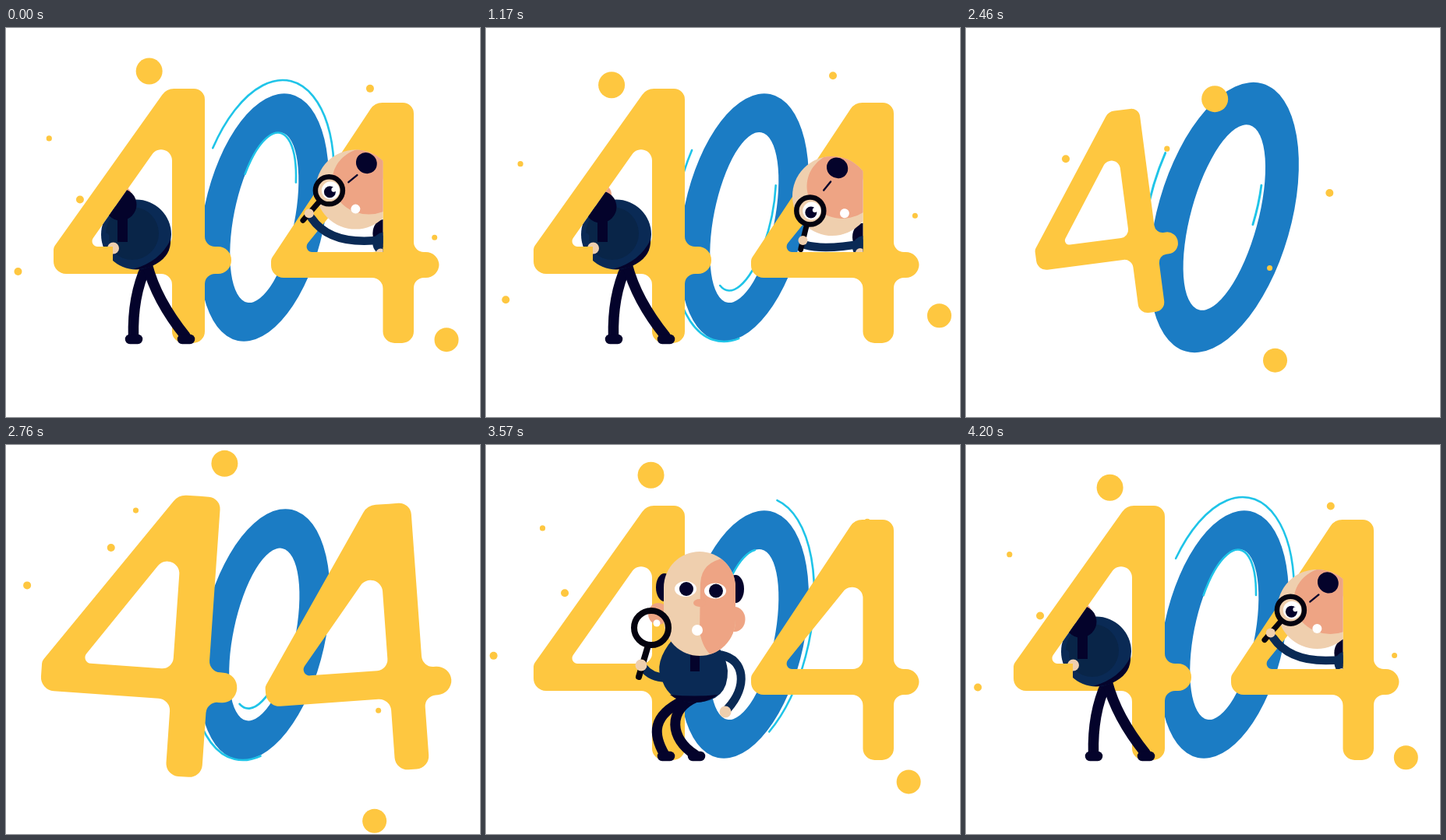
Recreate the animation shown at these times as an HTML page with a canvas. Size 608 by 500 pixels, loop 4.23 s.

```html
<!DOCTYPE html>
<html lang="en">
<head>
<meta charset="utf-8">
<title>404</title>
<style>
html, body { margin: 0; width: 100%; height: 100%; overflow: hidden; background: #fff; }
canvas { display: block; }
</style>
</head>
<body>
<canvas id="stage" width="608" height="500"></canvas>
<script>
const g = document.getElementById('stage').getContext('2d');
const YELLOW = '#fec740', BLUE = '#1b7cc4', CYAN = '#1fc4e8', NAVY = '#0a2a55', DARK = '#04032b',
      BLACK = '#04030f', SKIN = '#efcfae', PINK = '#eea484', WHITE = '#fff';
const LOOP = 4.23, CUT = 2.16, RAD = Math.PI / 180, TAU = 2 * Math.PI;

// Smoothstep from 0 to 1 between times a and b.
function ease(t, a, b) {
  const x = Math.min(1, Math.max(0, (t - a) / (b - a)));
  return x * x * (3 - 2 * x);
}
const mix = (a, b, k) => a + (b - a) * k;
const polar = (x, y, r, angle) => [x + r * Math.cos(angle * RAD), y + r * Math.sin(angle * RAD)];

function layer(draw) {
  g.save();
  draw();
  g.restore();
}
function disc(x, y, rx, color, ry = rx, angle = 0) {
  g.fillStyle = color;
  g.beginPath();
  g.ellipse(x, y, rx, ry, angle * RAD, 0, TAU);
  g.fill();
}
function ring(x, y, r, width) {
  g.strokeStyle = BLACK;
  g.lineWidth = width;
  g.beginPath();
  g.arc(x, y, r, 0, TAU);
  g.stroke();
}
function fill(d, color) {
  g.fillStyle = color;
  g.fill(new Path2D(d));
}
function line(d, color, width) {
  g.strokeStyle = color;
  g.lineWidth = width;
  g.lineCap = 'round';
  g.stroke(new Path2D(d));
}
function foot(x, y) {
  line(`M${x - 5},${y}h10`, DARK, 12.5);
}

// Closed polygon of [x, y, corner radius].
function rounded(pts) {
  const last = pts[pts.length - 1];
  g.moveTo((last[0] + pts[0][0]) / 2, (last[1] + pts[0][1]) / 2);
  pts.forEach(([x, y, r], i) => {
    const [nx, ny] = pts[(i + 1) % pts.length];
    g.arcTo(x, y, nx, ny, r);
  });
  g.closePath();
}
// Stem runs a..b, crossbar u..d; tip and peak are the sharp corners of the hole.
function four({ left, right, a, b, top, u, d, cornerY, topX, tip, peak }) {
  g.fillStyle = YELLOW;
  g.beginPath();
  rounded([[b, top, 14], [b, u, 13], [right, u, 17], [right, d, 17], [b, d, 13], [b, 405, 15],
    [a, 405, 15], [a, d, 14], [left, d, 16], [left, cornerY, 9], [topX, top, 18]]);
  rounded([[tip, u, 7], [a, u, 13], [a, peak, 14]]);
  g.fill('evenodd');
}
const LEFT4 = { left: 61, right: 289, a: 213, b: 255, top: 78, u: 281, d: 316,
  cornerY: 282, topX: 206, tip: 104, peak: 126 };
const RIGHT4 = { left: 340, right: 555.5, a: 483.5, b: 523, top: 96, u: 288, d: 321,
  cornerY: 297, topX: 473, tip: 378, peak: 157 };

// Back-eased entrance around a digit's centre; the tilt follows the overshoot.
function pop(t, x, y, turn, draw) {
  if (t <= 0) return;
  const v = Math.min(1, t / .65) - 1, scale = 1 + 3 * v ** 3 + 2 * v ** 2;
  layer(() => {
    g.translate(x, y);
    g.rotate((scale - 1) * 38 * turn * RAD);
    g.scale(scale, scale);
    g.translate(-x, -y);
    draw();
  });
}

// Arc that grows out of one point, then runs around the ellipse.
function trail(s, x, y, rx, ry, tilt, start, base, speed) {
  const grown = ease(s, 2.2, 3.1);
  const from = mix(start, base + speed * (s - LOOP), grown) - 90;
  g.strokeStyle = CYAN;
  g.lineWidth = 2.6;
  g.lineCap = 'round';
  g.beginPath();
  g.ellipse(x, y, rx, ry, tilt * RAD, from * RAD, (from + 130 * grown) * RAD);
  g.stroke();
}
function zero(s) {
  g.fillStyle = BLUE;
  g.beginPath();
  g.ellipse(331, 243.5, 77.5, 162, 12 * RAD, 0, TAU);
  g.closePath();
  g.ellipse(331.3, 243.5, 39, 111.4, 11.3 * RAD, 0, TAU);
  g.fill('evenodd');
  trail(s, 330, 235, 86.2, 170.5, 11.4, 292, -67, -112);
  trail(s, 330.5, 236, 36.5, 103.4, 11.8, 60, 294, 113);
}

// Orbit radius, resting angle, size.
const DOTS = [[237, -133.5, 17], [288.5, 22.8, 15.5], [227, -58, 5], [285, -166.4, 3.6],
  [231.5, -3.9, 3.5], [310, 159.6, 5], [226, 178.8, 5]];
function dots(s) {
  const x = Math.min(1, (s - CUT) / .76);
  const swing = 46.5 * Math.exp(-.785 * (s - 2.46)) - 2.9;
  for (const [r, angle, size] of DOTS) {
    const burst = size < 4 ? x : 1 - (1 - x) ** 2.2; // specks drift, big dots shoot out
    disc(...polar(319, 250, r * burst, angle + swing), size * Math.min(1, x * 5), YELLOW);
  }
}

// Crawling through the zero, seen from behind.
function crawler(s) {
  const grow = ease(s, 2.82, 2.98);
  g.beginPath();
  g.rect(0, 0, 376, 500);
  g.clip();
  g.translate(270 + 70 * (1 - ease(s, 2.82, 3.04)) - 30 * ease(s, 3.2, 3.32), 400);
  g.scale(grow, grow);
  g.translate(-270, -400);
  line('M347,245Q356,224 382,209', NAVY, 11);
  disc(324, 273, 45, '#0a2850');
  disc(366, 262, 22, DARK);
  fill('M285,250Q272,272 284,298L291,306Q290,275 285,250Z', DARK);
  line('M284,280Q262,310 238,385', DARK, 13);
  line('M284,288Q268,335 271,397', DARK, 13);
  line('M232,392L239,387', DARK, 12.5);
  foot(270, 400);
}

// Standing in front of the zero with the glass.
function seeker(s) {
  const sway = 1 - ease(s, 3.3, 3.42) - ease(s, 3.74, 3.84);
  g.translate(250 + 25 * sway, 400);
  g.rotate(8 * sway * RAD);
  g.translate(-250, -400);
  disc(221, 217, 13, PINK, 14);
  line('M234,299Q212,300 202,286', NAVY, 11);
  line('M302,270C332,276 336,310 310,339', NAVY, 11);
  disc(307, 343, 7.5, SKIN);
  line('M254,328C212,348 214,372 229,398', DARK, 13);
  line('M270,324C232,340 236,378 268,398', DARK, 13);
  foot(231, 400);
  foot(270, 400);
  fill('M240,249Q214,280 226,303Q236,331 268,331Q311,330 310,290Q307,265 292,255Z', NAVY);
  fill('M236,321Q268,324 297,321Q284,331 268,331Q248,331 236,321Z', DARK);
  fill('M262,268H274V291H262Z', DARK);
  disc(229, 183, 11, DARK, 18);
  disc(320, 185, 11, DARK, 18);
  disc(319, 224, 13.5, PINK, 16);
  layer(() => {
    g.beginPath();
    g.roundRect(228, 137, 92, 134, 46);
    g.clip();
    g.fillStyle = SKIN;
    g.fillRect(228, 137, 92, 134);
    fill('M308,145Q276,150 275,178L274,240Q278,262 290,271H330V145Z', PINK);
  });
  disc(274, 203, 8, PINK, 5);
  for (const [x, y] of [[256, 185], [294, 187.5]]) {
    disc(x, y, 14, WHITE, 10);
    disc(x + 1, y, 9, DARK);
  }
  disc(271, 238, 7, WHITE);
  line('M207,261L196,298', BLACK, 8);
  ring(212, 235, 22, 8);
  disc(219, 229, 4.5, WHITE);
  disc(199, 283, 7.5, SKIN);
}

// Bent into the hole of the first digit, whose diagonal and bar hide the rest.
function peeper(s) {
  const nod = ease(s, 4.5, 5.1) - ease(s, 5.45, 5.9);
  g.clip(new Path2D('M231,100L104,281H137V500H608V100Z'));
  g.translate(34 * (1 - ease(s, 3.8, 4)), 0);
  line('M180,306Q162,345 163.5,397', DARK, 13.5);
  line('M181,304Q193,350 230,396', DARK, 13.5);
  foot(164, 400);
  foot(231, 400);
  disc(167, 265.5, 45, NAVY);
  disc(162, 264, 34, '#092548');
  fill('M163,310Q198,300 211,272Q212,292 193,303Q180,311 163,310Z', DARK);
  disc(148, 216 - 2 * nod, 13, PINK);
  disc(147, 227 + 3 * nod, 20.5, DARK);
  fill('M143,238H156V275H143Z', DARK);
  line('M128,268Q126,280 137,284', NAVY, 9);
  disc(137.5, 283, 7.5, SKIN);
}

// Head x and y, tilt, sideways turn, swing of the glass.
const POSES = [[448, 207, 0, 0, 0], [444, 216, -12, 11, -32], [464, 198, 14, 17, 7]];
function head(s) {
  const down = ease(s, 4.5, 5.1), up = ease(s, 5.45, 5.9), hidden = 1 - ease(s, 3.84, 4.25);
  const [hx, hy, tilt, turn, swing] = POSES[0].map((v, i) =>
    mix(mix(v, POSES[1][i], down), POSES[2][i], up));
  const [gx, gy] = polar(hx, hy, 34, 178 + swing);
  const handle = r => polar(gx, gy, r, 131 + .85 * swing);
  const [ax, ay] = handle(39), shoulder = 266 + (hy - 198) * .6;

  g.beginPath();
  g.rect(340, 90, 143.5, 198);
  g.clip();
  g.translate(60 * hidden, 100 * hidden);
  disc(484, shoulder - 8, 14, DARK, 18);
  disc(486, shoulder + 5, 16, NAVY, 15);
  line(`M${ax + 3},${ay + 6}Q${ax + 28},${Math.max(ay, shoulder) + 9} 484,${shoulder}`, NAVY, 10.5);
  disc(480, 289, 6, SKIN);
  layer(() => {
    g.translate(hx, hy);
    g.rotate(tilt * RAD);
    disc(-20, 35, 10, PINK);
    disc(0, 0, 51, SKIN);
    layer(() => {
      g.beginPath();
      g.arc(0, 0, 51, 0, TAU);
      g.clip();
      disc(17, -11, 47, PINK, 43);
    });
    disc(14, -34, 13, DARK, 14, -40);
    line('M-9,-9.5L2,-18.5', DARK, 2.4);
    disc(turn, 25, 6, WHITE);
  });
  line(`M${handle(20)}L${handle(51)}`, BLACK, 7);
  disc(gx, gy, 18, SKIN);
  disc(gx + 2, gy, 11.5, WHITE);
  disc(gx + 1, gy + 2, 7.5, DARK);
  disc(gx + 6, gy - 1, 3, WHITE);
  ring(gx, gy, 17.5, 6.5);
  disc(ax, ay, 6, SKIN);
}

function frame(now) {
  const t = now / 1000 % LOOP;
  const s = t < CUT ? t + LOOP : t; // one continuous take from the cut
  g.fillStyle = WHITE;
  g.fillRect(0, 0, 608, 500);
  pop(s - 2.17, 331, 243.5, 1, () => zero(s));
  dots(s);
  pop(s - 2.315, 174, 240, 1, () => four(LEFT4));
  if (s > 2.82 && s < 3.32) layer(() => crawler(s));
  pop(s - 2.465, 447, 250, -1, () => four(RIGHT4));
  if (s >= 3.32 && s < 3.82) layer(() => seeker(s));
  if (s >= 3.82) {
    layer(() => peeper(s));
    layer(() => head(s));
  }
  requestAnimationFrame(frame);
}
requestAnimationFrame(frame);
</script>
</body>
</html>
```
